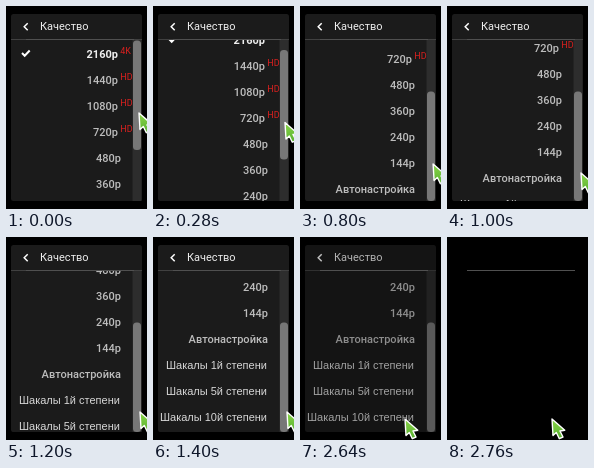
Write an HTML page that moves like this. It is 141x203 px and loops after 2.8 s.

```html
<!DOCTYPE html>
<html lang="ru">
<head>
<meta charset="utf-8">
<title>Качество</title>
<style>
  html, body { margin: 0; width: 100%; height: 100%; overflow: hidden; background: #000; }
  svg { display: block; width: 141px; height: 203px; }
  text { font: 500 11px Roboto, sans-serif; fill: #bdbdbd; }
  .title { font-weight: 400; fill: #eee; }
  .current { font-weight: 700; fill: #eee; }
  .plain { font: 11px "Liberation Sans", Arial, sans-serif; fill: #d8d8d8; }
  .badge { font: 400 9px Roboto, sans-serif; fill: #d8201f; }
  .icon { fill: none; stroke: #fff; }
  .cursor { fill: url(#lime); stroke: #fff; stroke-width: 1.4; stroke-linejoin: round; }
</style>
</head>
<body>
<svg viewBox="0 0 141 203">
  <defs>
    <clipPath id="view"><rect x="5" y="34" width="131" height="161"/></clipPath>
    <linearGradient id="lime" x2="0" y2="1">
      <stop stop-color="#8bd64a"/><stop offset="1" stop-color="#58b030"/>
    </linearGradient>
  </defs>
  <g id="panel">
    <rect x="5" y="8" width="131" height="187" rx="2.5" fill="#1b1b1b"/>
    <path class="icon" stroke-width="1.5" d="M21.7 17.3L18.2 20.8L21.7 24.3"/>
    <text class="title" x="34" y="24">Качество</text>
    <rect x="5" y="33" width="131" height="1" fill="#404040"/>
    <g clip-path="url(#view)">
      <rect x="126.500" y="34" width="9" height="161" fill="#2d2d2d"/>
      <g id="list">
        <path class="icon" stroke-width="2" d="M16 47L18.700 49.700L23.700 44.500"/>
      </g>
      <rect id="thumb" x="127" y="34.500" width="8" height="109.500" rx="3.500" fill="#777"/>
    </g>
  </g>
  <rect x="20" y="33" width="108" height="1" fill="#505050"/>
  <g id="cursor" class="cursor">
    <path id="arrow" d="M0 0L1 16.500L4.300 13.500L7.300 19.700L11 18L8 12L12.800 11.200Z"/>
    <path id="hand" d="M-1.500 .8C-.4-.8 1.600-.2 2.300 1.300L5 7.400C6 6.300 7.600 6.500 8.300 7.700C9.500 6.800 11 7.300 11.500 8.600C12.800 8.100 13.900 8.900 14.200 10.300C15 13.500 15.200 16 14 18.500L14.300 20L6.200 22L5.300 20.500C2 19-1.200 16-3.800 13.500C-5 11.800-3 10.300-1.300 11.300L1.600 13L-1.700 3.500C-2.100 2.400-2.100 1.600-1.500 .8Z"/>
  </g>
</svg>
<script>
const LOOP = 2800, STEP = 40;
const ROW = 26, FIRST = 52, THUMB_MAX = 51, RATIO = 1.44;
const $ = id => document.getElementById(id);
const list = $('list'), thumb = $('thumb'), panel = $('panel');
const cursor = $('cursor'), arrow = $('arrow'), hand = $('hand');

const rows = [
  ['2160p', '4K', 'current'], ['1440p', 'HD'], ['1080p', 'HD'], ['720p', 'HD'],
  ['480p'], ['360p'], ['240p'], ['144p'], ['Автонастройка'],
  ['Шакалы 1й степени', '', 'plain', 13],
  ['Шакалы 5й степени', '', 'plain', 13],
  ['Шакалы 10й степени', '', 'plain', 7]
];

// Times in ms followed by a value
const dragY = [[40, 0], [280, 9.5], [560, 32], [800, 51], [1000, 60], [1160, 68]];
const dragX = [[40, 133], [280, 132], [560, 132], [1000, 134]];
const extra = [[900, 0], [960, 4], [1000, 11], [1360, 74], [1400, 81]];

function addText(value, x, y, cls, anchor) {
  const el = document.createElementNS('http://www.w3.org/2000/svg', 'text');
  el.textContent = value;
  el.setAttribute('x', x);
  el.setAttribute('y', y);
  if (cls) el.setAttribute('class', cls);
  if (anchor) el.setAttribute('text-anchor', anchor);
  list.append(el);
}

rows.forEach(([label, badge, cls, left], i) => {
  const y = FIRST + i * ROW;
  if (left) addText(label, left, y, cls);
  else addText(label, badge ? 112 : 115, y, cls, 'end');
  if (badge) addText(badge, 114.3, y - 4, 'badge');
});

function at(keys, t) {
  const i = keys.findIndex(k => k[0] > t);
  if (i === 0) return keys[0][1];
  if (i < 0) return keys[keys.length - 1][1];
  const [t0, a] = keys[i - 1], [t1, b] = keys[i];
  return a + (b - a) * (t - t0) / (t1 - t0);
}

const clamp = v => Math.max(0, Math.min(1, v));
const move = (el, x, y) => el.setAttribute('transform', `translate(${x} ${y})`);

function draw(now) {
  const t = Math.floor(now % LOOP / STEP) * STEP;
  const drag = at(dragY, t);
  const offset = Math.min(THUMB_MAX, drag);
  move(thumb, 0, offset);
  move(list, 0, -Math.round(offset * RATIO + at(extra, t)));

  const p = clamp((t - 1600) / 480);
  const ease = p * p * (3 - 2 * p);
  const closing = t >= 2640;
  const x = closing ? 105 : at(dragX, t) - 31 * ease;
  const y = closing ? 182 : 107 + drag + 5.5 * ease;
  const pointing = !closing && x < 126;
  hand.style.display = pointing ? '' : 'none';
  arrow.style.display = pointing ? 'none' : '';
  move(cursor, x, y);
  panel.style.opacity = 1 - clamp((t - 2600) / 160);
}

const start = performance.now();
function tick() {
  draw(performance.now() - start);
  requestAnimationFrame(tick);
}
tick();
</script>
</body>
</html>
```
